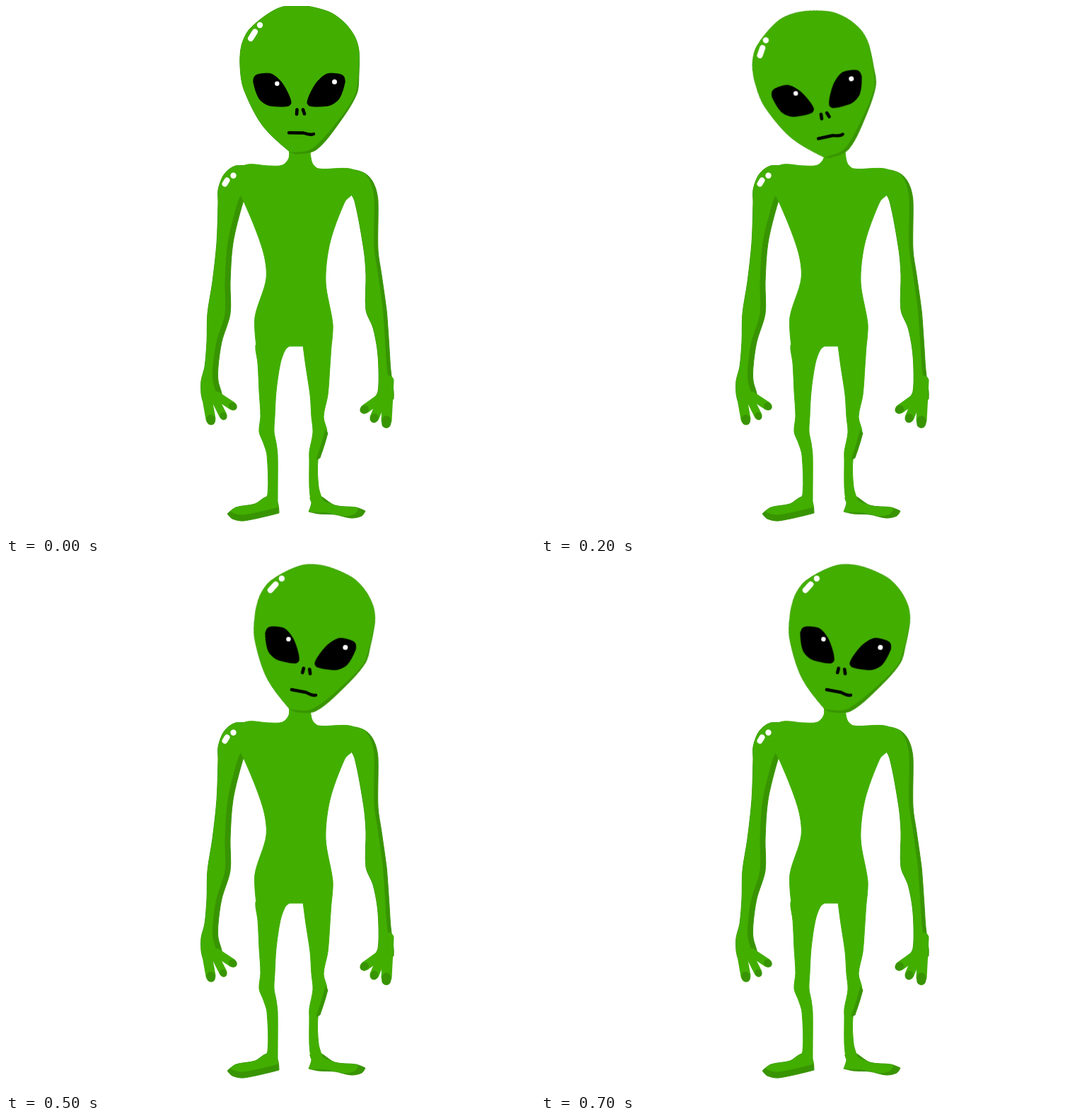
An HTML page that plays this animation: 748x748 px, repeating every 0.8 s.

```html
<!DOCTYPE html>
<html lang="en">
<head>
<meta charset="utf-8">
<title>Alien tilting its head</title>
<style>
  html, body { margin: 0; width: 100%; height: 100%; overflow: hidden; background: #fff; }
  svg { display: block; width: 100vw; height: 100vh; }
  path, line { stroke-linecap: round; stroke-linejoin: round; }
  .skin { fill: #42ae00; stroke: #42ae00; }
  .shade { fill: #389400; stroke: #389400; }
  .ink { fill: #000; stroke: #000; }
  .shine { fill: #fff; stroke: #fff; }
</style>
</head>
<body>
<svg viewBox="0 0 748 748">
  <g id="body"></g>
  <g id="head"></g>
</svg>
<script>
const NS = "http://www.w3.org/2000/svg";
const body = document.getElementById("body");
const head = document.getElementById("head");
let clips = 0;

function add(parent, tag, attrs) {
  const el = document.createElementNS(NS, tag);
  for (const k in attrs) el.setAttribute(k, attrs[k]);
  parent.append(el);
  return el;
}

const parse = text => text.trim().split(/\s+/).map(s => s.split(",").map(Number));

function unit(a, b) {
  const dx = b[0] - a[0], dy = b[1] - a[1], len = Math.hypot(dx, dy) || 1;
  return [dx / len, dy / len];
}

// Closed curve through key points; sharp turns stay corners.
function smooth(p) {
  const n = p.length;
  const dir = p.map((q, i) => {
    const a = p[(i + n - 1) % n], b = p[(i + 1) % n];
    const u = unit(a, q), v = unit(q, b);
    return u[0] * v[0] + u[1] * v[1] < 0.35 ? [0, 0] : unit(a, b);
  });
  return p.reduce((d, a, i) => {
    const j = (i + 1) % n, b = p[j];
    const h = Math.hypot(b[0] - a[0], b[1] - a[1]) * 0.3;
    return d + `C${a[0] + dir[i][0] * h},${a[1] + dir[i][1] * h} ` +
      `${b[0] - dir[j][0] * h},${b[1] - dir[j][1] * h} ${b}`;
  }, `M${p[0]}`) + "Z";
}

const outline = text => smooth(parse(text));

// Limb from rows of "y,left,right".
function limb(text) {
  const rows = parse(text);
  return smooth([...rows.map(([y, l]) => [l, y]), ...rows.map(([y, , r]) => [r, y]).reverse()]);
}

const fill = (parent, cls, d) => add(parent, "path", { class: cls, d });

// Dark shape with a moved light copy inside, leaving a shaded rim.
function shaded(parent, d, move) {
  const id = "clip" + clips++;
  add(add(parent, "clipPath", { id }), "path", { d });
  fill(parent, "shade", d);
  const lit = add(parent, "g", { "clip-path": `url(#${id})` });
  fill(lit, "skin", d).setAttribute("transform", move);
}

const bar = (parent, cls, x1, y1, x2, y2, w) =>
  add(parent, "line", { class: cls, x1, y1, x2, y2, "stroke-width": w });

function finger(x1, y1, x2, y2, w) {
  bar(body, "skin", x1, y1, x2, y2, w);
  bar(body, "shade", x2, y2, x2 + (x2 - x1) * 0.08, y2 + (y2 - y1) * 0.08, w - 2);
}

function glint(parent, x, y, dx, dy) {
  bar(parent, "shine", x, y, x + dx, y + dy, 8);
}

const dot = (parent, cx, cy, r) => add(parent, "circle", { class: "shine", cx, cy, r, "stroke-width": 0 });

// Arms and hands
shaded(body, limb(`226,325,345 232,314,347 242,306,348 260,300,343 278,300,335 335,298,321
  390,292,317 435,285,317 475,284,305 510,281,300 530,276,300 548,276,305 558,278,306`), "translate(-8 0)");
shaded(body, limb(`232,478,494 237,478,508 246,478,517 259,484,523 276,493,526 345,506,526
  380,509,531 430,509,538 455,519,540 485,525,542 515,527,544 545,526,548 556,520,548`), "translate(-6 -4)");

finger(284, 553, 289.5, 584, 14);
finger(295, 555, 307, 579, 11);
finger(298, 551, 320, 565.5, 12);
finger(527, 556, 507.5, 570, 13);
finger(531, 558, 521, 582, 13);
finger(541, 530, 538, 586, 15);

// Feet and legs
shaded(body, outline("369,694 352,704 325,709 313,718 320,725 336,728 386,717 383,700"), "translate(0 -9)");
shaded(body, outline("430,696 432,703 428,715 442,718 465,719 488,724 503,721 508,714 495,709 465,706 442,692"),
  "translate(-10 -3)");
fill(body, "skin", limb(`480,353,402 486,353,395 505,356,388 545,358,382 580,360,380 602,358,379
  618,364,382 635,369,384 690,370,384 704,362,384`));
fill(body, "skin", limb(`480,420,460 510,424,458 550,430,455 581,432,449 603,434,454 630,429,447
  642,429,441 680,429,442 700,431,448`));
fill(body, "shade", "M452 600 L455 604 L444 639 L439 641 L446 620 Z");

// Trunk
fill(body, "skin", outline(`400,200 400,215 391,225 372,226 338,225 318,245 336,276 363,345 368,385
  352,440 354,481 460,481 462,450 452,390 458,335 479,277 488,268 508,250 490,231 442,230 433,222 430,205`));
glint(body, 309.5, 251.5, 3, -5);
dot(body, 321.5, 239.8, 4.2);

// Head
shaded(head, outline(`400,205 362,168 336,117 331,85 333,56 345,32 383,4 415,-1 456,8 478,23 493,43
  499,63 499,95 496,124 472,164 439,203 412,209`), "translate(-1 2) rotate(3 499 85)");

const eye = outline("350,108 352,99 360,96 375,96 388,106 397.5,121 403,136 400,141 385,142 370,140 358,131");
fill(head, "ink", eye);
fill(head, "ink", eye).setAttribute("transform", "translate(829 0) scale(-1 1)");
dot(head, 383.3, 109.8, 3.2);
dot(head, 464.5, 107.3, 3.5);

bar(head, "ink", 411.5, 146.5, 411, 153, 4.6);
bar(head, "ink", 420, 146.5, 422, 152.5, 4.6);
add(head, "path", { d: "M400 179.3 L421 179.5 Q430 183 435 181", fill: "none", stroke: "#000", "stroke-width": 4.4 });
glint(head, 346, 46, 6, -9.5);
dot(head, 359, 27, 4.2);

// Head poses, held 100 ms each: angle and pivot
const rest = [0, 415, 205];
const left = [-7.7, 430, 218], farLeft = [-13, 432.5, 218];
const right = [10, 403, 201], farRight = [19.7, 403, 201];
const poses = [rest, left, farLeft, left, rest, right, farRight, right, rest];

head.animate(poses.map(([a, x, y], i) => ({
  offset: i / 8,
  easing: "steps(1, end)",
  transform: `translate(${x}px, ${y}px) rotate(${a}deg) translate(${-x}px, ${-y}px)`
})), { duration: 800, iterations: Infinity });
</script>
</body>
</html>
```
